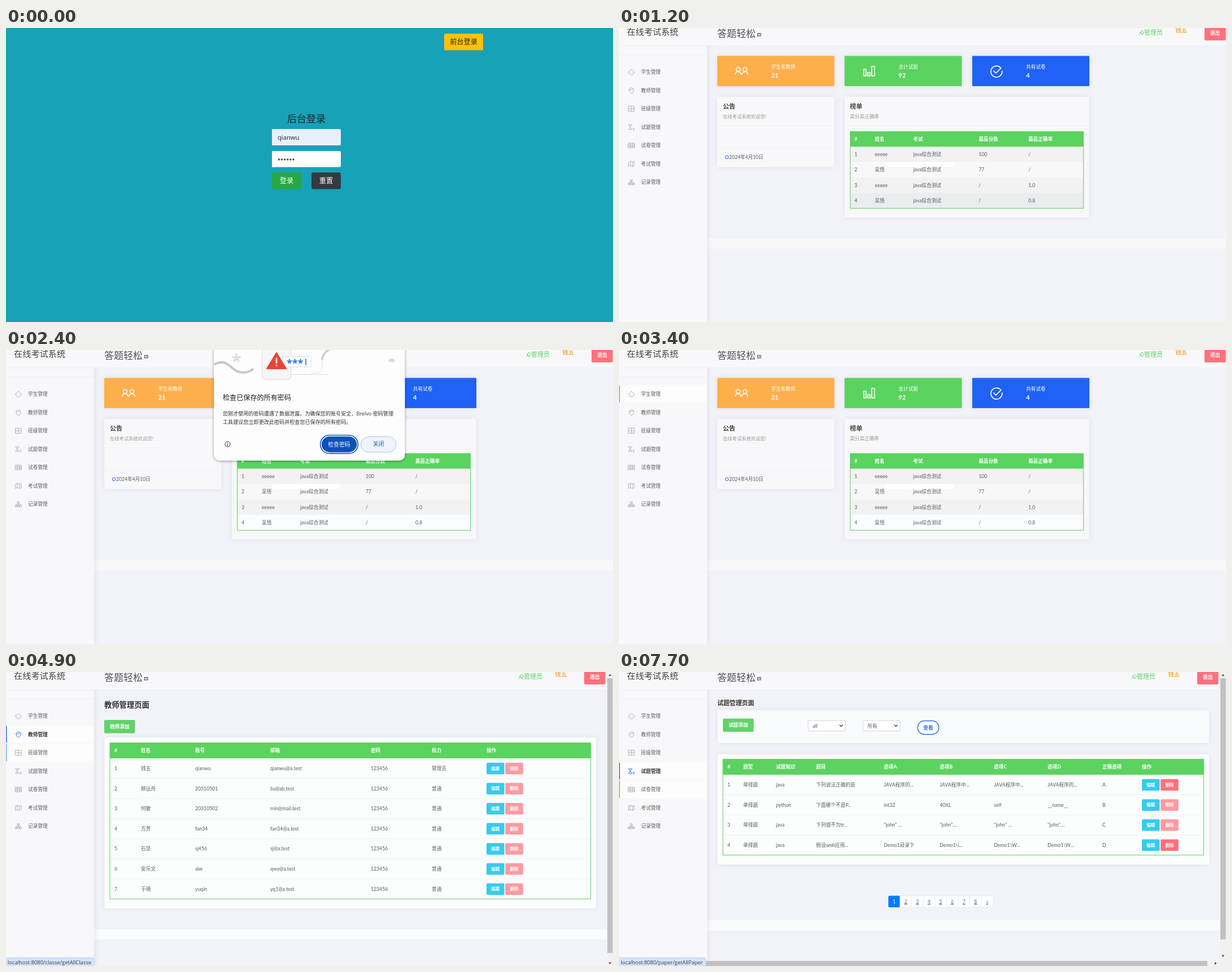
These frames come from a looping animation (1075x521 px, 8 s). An HTML page:

```html
<!DOCTYPE html>
<html lang="zh-CN">
<head>
<meta charset="utf-8">
<style>
  html, body { margin: 0; width: 100%; height: 100%; overflow: hidden; }
  svg { display: block; width: 1075px; height: 521px; font-family: Lato, "Noto Sans CJK SC", "Noto Sans CJK", sans-serif; }
  text { white-space: pre; }
  .ui { font-family: "Open Sans", "Noto Sans CJK SC", "Noto Sans CJK", sans-serif; }
  .b { font-weight: 700; }
  .m { text-anchor: middle; }
  .card { filter: drop-shadow(0 0 5px rgba(82, 63, 105, .1)); }
  .line { fill: none; stroke-linecap: round; stroke-linejoin: round; }
</style>
</head>
<body>
<svg id="stage" viewBox="0 0 1075 521"></svg>
<script>
const GREEN = '#5bd35f', BLUE = '#1f62f5', PINK = '#ff717c', PALE_PINK = '#ff9aa2', INK = '#595b64';

// Drawing helpers; text y is the vertical middle.
const rect = (x, y, w, h, fill, r = 0, extra = '') =>
  `<rect x="${x}" y="${y}" width="${w}" height="${h}" rx="${r}" fill="${fill}" ${extra}/>`;
const text = (x, y, str, size = 8.7, fill = INK, cls = '') =>
  `<text x="${x}" y="${y + size * .36}" font-size="${size}" fill="${fill}" class="${cls}">${str}</text>`;
const line = (d, stroke, w = 1, extra = '') =>
  `<path class="line" d="${d}" stroke="${stroke}" stroke-width="${w}" ${extra}/>`;
const button = (x, y, w, h, fill, label, size = 8, cls = 'b m', r = 2) =>
  rect(x, y, w, h, fill, r) + text(x + w / 2, y + h / 2, label, size, '#fff', cls);
const card = (x, y, w, h, fill = '#fcfdfd') => rect(x, y, w, h, fill, 1, 'class="card"');
const group = (opacity, content) => `<g opacity="${opacity}">${content}</g>`;

const ramp = (t, from, to) => Math.min(1, Math.max(0, (t - from) / (to - from)));
const mix = (a, b, k) => `rgb(${a.map((v, i) => Math.round(v + (b[i] - v) * k))})`;
const latest = (t, list, none) => list.reduce((found, [at, value]) => t >= at ? value : found, none);

const menu = [
  ['学生管理', 'M-5 0L0-5L5 0A5 5 0 0 1-5 0M-2 1h.1M2 1h.1'],
  ['教师管理', 'M-4-1C-4-6 4-6 4-1C4 3 2 5 0 5S-4 3-4-1M-4-1Q1-1 2-3L4-1'],
  ['班级管理', 'M-5-4.5H5V4.5H-5ZM0-4.5V4.5M-5 0H5'],
  ['试题管理', 'M-5-4L1 4M1-4L-5 4M-5-4H1M-5 4H1M3 2H5L3 5H5'],
  ['试卷管理', 'M-5.5-4H5.5V4H-5.5ZM-5.5-1.3H5.5M-5.5 1.3H5.5M-2-4V4M2-4V4'],
  ['考试管理', 'M-5-3L-2-4.5L2-3L5-4.5V3L2 4.5L-2 3L-5 4.5ZM-2-4.5V3M2-3V4.5'],
  ['记录管理', 'M-1.5-4.5H1.5V-2H-1.5ZM0-2V2M-4 2V0H4V2M-5.5 2H-2.5V4.5H-5.5ZM-1.5 2H1.5V4.5H-1.5ZM2.5 2H5.5V4.5H2.5Z']
];
const urls = ['student/getAllStudent', 'teacher/getAllTeacher', 'classe/getAllClasse',
  'question/getAllQuestion', 'paper/getAllPaper'];

const teachers = [
  ['钱五', 'qianwu', 'qianwu@a.test', '管理员'], ['柳远舟', '20310501', 'liu@ab.test', '普通'],
  ['何敏', '20310502', 'min@mail.test', '普通'], ['方芳', 'fan34', 'fan34@a.test', '普通'],
  ['石坚', 'sj456', 'sj@a.test', '普通'], ['安乐文', 'alw', 'qwe@a.test', '普通'], ['于晴', 'yuqin', 'yq1@a.test', '普通']
].map(([name, id, mail, role]) => [name, id, mail, '123456', role]);
const classes = [['计算机1班', 0], ['计算机2班', 1], ['电子商务1班', 2], ['数字媒体1班', 6],
  ['电子信息1班', 5], ['电子商务2班', 3], ['物联网1班', 4]].map(([name, i]) => [name, teachers[i][0]]);
const students = [...'悟明丽文青雪云乐宁晨雨山'].map((given, i) =>
  ['吴林孙程'[i % 4] + given, 20310401 + i, `stu${10 + i}@ab.test`, '123456', classes[i % 7][0]]);
const questions = [
  ['单择题', 'java', '下列说法正确的是', 'JAVA程序的...', 'JAVA程序中...', 'JAVA程序中...', 'JAVA程序的...', 'A'],
  ['单择题', 'python', '下面哪个不是P...', 'int32', '40XL', 'self', '__name__', 'B'],
  ['单择题', 'java', '下列值不为tr...', '"john" ...', '"john"....', '"john" ...', '"john"....', 'C'],
  ['单择题', 'java', '假设web应用...', 'Demo1目录下', 'Demo1\\i...', 'Demo1\\W...', 'Demo1\\W...', 'D']
];

// The last column holds the edit and delete buttons.
function table(top, heads, xs, rows, pink = () => PINK) {
  const pitch = 35.6, last = xs[xs.length - 1];
  let out = rect(184, top, 852, 28, GREEN);
  heads.forEach((h, i) => out += text(xs[i], top + 14, h, 8.6, '#fff', 'b'));
  rows.forEach((row, r) => {
    const y = top + 28 + pitch * (r + .5);
    [r + 1, ...row].forEach((cell, i) => out += text(xs[i], y, cell));
    if (r) out += line(`M184 ${y - pitch / 2}H1036`, '#eff1f4');
    out += button(last, y - 10, 31.5, 20.5, '#36cbee', '编辑', 7.6)
      + button(last + 33.3, y - 10, 31.5, 20.5, pink(r), '删除', 7.6);
  });
  return out + rect(184, top + .5, 851.5, 27.5 + pitch * rows.length, 'none', 0, `stroke="${GREEN}"`);
}

const footer = y => rect(156, y, 908, 18, '#fafbfc');
const addButton = (x, y, label) => button(x, y, 54.5, 23.5, '#62d26b', label, 8.7);

const pages = [
  () => text(174, 55, '学生管理页面', 10.9, '#333', 'b') + addButton(174, 69, '学生添加') + card(174.5, 100, 870.5, 480)
    + table(109.5, ['#', '姓名', '账号', '邮箱', '密码', '班级', '操作'], [192, 240, 336, 497, 670, 760, 883], students),
  () => text(174, 58, '教师管理页面', 13.3, '#2d2d33', 'b') + addButton(174, 85, '教师添加') + card(174.5, 116, 870.5, 303)
    + table(125, ['#', '姓名', '账号', '邮箱', '密码', '权力', '操作'], [192, 239, 335, 468, 646, 754, 851], teachers, () => PALE_PINK)
    + footer(456),
  () => text(174, 58, '班级管理页面', 13.3, '#2d2d33', 'b') + addButton(174, 85, '班级添加') + card(174.5, 116, 870.5, 303)
    + table(125, ['#', '班级名', '班主任', '操作'], [192, 275, 537, 705.5], classes) + footer(456),
  questionPage
];

function select(x, label) {
  return rect(x, 86, 66, 18.5, '#fff', 2, 'stroke="#ced4da"') + text(x + 8, 95.5, label, 8.7)
    + line(`M${x + 56} 94l2.5 2.5l2.5-2.5`, '#333', 1.3);
}

function questionPage() {
  let out = text(174, 55, '试题管理页面', 10.9, '#333', 'b') + card(174.5, 67.5, 870.5, 58.5, '#f9fafb')
    + addButton(184, 82.5, '试题添加') + select(335, 'all') + select(432, '所有')
    + rect(529, 86.5, 37.5, 24, '#fff', 12, 'stroke="#2b6cf0" stroke-width="1.4"') + text(547.7, 98.5, '查看', 8.6, '#2b6cf0', 'b m')
    + card(174.5, 145.5, 870.5, 195.5)
    + table(154, ['#', '题型', '试题知识', '题目', '选项A', '选项B', '选项C', '选项D', '正确选项', '操作'],
      [192, 220, 278, 349, 469, 568, 664, 759, 856, 926], questions, r => r % 3 ? PALE_PINK : PINK);
  [...'12345678»'].forEach((n, i) => {
    const x = 477 + i * 20.6;
    out += rect(x, 396.5, 20.6, 20.5, i ? '#fff' : '#007bff', i ? 0 : 2, i ? 'stroke="#e3e6ea" stroke-width=".8"' : '')
      + `<g ${i ? 'text-decoration="underline"' : ''}>${text(x + 10.3, 406.7, n, 8.7, i ? '#2b7de9' : '#fff', 'm')}</g>`;
  });
  return out + footer(440);
}

function dashboard(t) {
  const tile = (x, fill, label, n, icon) => card(x, 49.5, 207.5, 53.5, fill)
    + text(x + 95.5, 69, label, 8.6, '#fff') + text(x + 95.5, 84, n, 11, '#fff', 'b')
    + line(icon, '#fff', 1.7, `transform="translate(${x + 43} 76)"`);
  const person = x => `M${x - 5} 6C${x - 5} 0 ${x + 5} 0 ${x + 5} 6M${x - 3.5}-2.5a3.5 3.5 0 1 0 7 0a3.5 3.5 0 1 0-7 0`;
  let out = tile(174, '#fdaf4b', '学生和教师', 21, person(-6) + person(6))
    + tile(399.5, GREEN, '总计试题', 92, 'M-9-3h4v12h-4zM-2 3h4v6h-4zM5-8h5v17h-5z')
    + tile(625.5, BLUE, '共有试卷', 4, 'M7-6A10 10 0 1 0 10 0M-5 0l4 4l9-9')
    + card(174, 122, 207.5, 124.5, '#f8f8fa') + text(184, 139, '公告', 11, '#444', 'b')
    + text(184, 157, '在线考试系统欢迎您!', 8.3, '#999') + line('M174 173.5H381M174 213.5H381M400 173.5H832', '#eff0f3')
    + '<circle cx="191" cy="229" r="2.8" fill="none" stroke="#2b6cf0"/>' + text(195, 229, '2024年4月10日', 8.6)
    + card(400, 122, 432.5, 213.5, '#f8f8fa') + line('M400 173.5H832', '#eff0f3')
    + text(409, 139, '榜单', 11, '#444', 'b') + text(409, 157, '高分高正确率', 8.6, '#999')
    + rect(409, 183, 414, 27.5, GREEN);
  const xs = [417, 453, 521, 637, 725], exam = 'java综合测试';
  ['#', '姓名', '考试', '最高分数', '最高正确率'].forEach((h, i) => out += text(xs[i], 197, h, 8.6, '#fff', 'b'));
  const hovered = mix([235, 236, 238], [250, 252, 255], ramp(t, 1400, 1700));
  [['eeeee', exam, 100, '/'], ['吴悟', exam, 77, '/'], ['eeeee', exam, '/', '1.0'], ['吴悟', exam, '/', '0.8']].forEach((row, r) => {
    const y = 210.5 + r * 27.2;
    out += rect(409, y, 414, 27.2, r == 3 ? hovered : r % 2 ? '#f8f8fa' : '#f2f2f3');
    [r + 1, ...row].forEach((cell, i) => out += text(xs[i], y + 13.6, cell));
  });
  return out + rect(409.5, 183.5, 413, 136, 'none', 0, `stroke="${GREEN}"`)
    + rect(472, 237.5, 120, 8.5, '#fff') + rect(156, 373, 919, 18, '#f8f8fa');
}

function dialog(t) {
  const k = ramp(t, 2100, 2400);
  return rect(368, -20, 338.5, 216, '#fdfdfe', 10, 'style="filter:drop-shadow(0 1px 2px rgba(0,0,0,.4))"')
    + text(408, 19, '*', 32, '#dadce0', 'b m ui')
    + line('M370 25C385 17 393 25 402 33S426 43 437 34', '#c4c7cc', 4)
    + line('M504 43.5H570M541 41C556 42 560 39 560 28V16Q562 3 575-2', '#d8dbdf')
    + line('M560 16Q562 3 575-2', '#c4c7cc', 3)
    + rect(453.5, -8, 51, 60, '#f5f6f8', 5, 'stroke="#d5d8dd"')
    + rect(490, 11.5, 50, 18.5, '#fff', 2, 'stroke="#d5d8dd"')
    + text(497, 23.5, '***', 18, '#2b6fe0', 'b ui') + line('M531 16V26', '#2b6fe0', 1.6)
    + '<path d="M479 5L496 33H462Z" fill="#ea4335" stroke="#ea4335" stroke-width="2" stroke-linejoin="round"/>'
    + line('M479 15V23M479 27.5v.1', '#fff', 2.6)
    + '<path d="M677 21a6 6 0 0 1 12 0z" fill="#dadce0"/>'
    + text(384, 84.5, '检查已保存的所有密码', 12.1, '#1f1f1f', 'ui')
    + text(384, 113, '您刚才使用的密码遭遇了数据泄露。为确保您的账号安全，Brelvo 密码管理', 9.1, '#333', 'ui')
    + text(384, 128, '工具建议您立即更改此密码并检查您已保存的所有密码。', 9.1, '#333', 'ui')
    + '<circle cx="392.5" cy="167" r="4.6" fill="none" stroke="#333"/>' + line('M392.5 166.5V169.5M392.5 164.6v.1', '#333', 1.1)
    + rect(556.8, 151, 66.5, 32.4, '#fff', 16, 'stroke="#0b57d0" stroke-width="1.6"')
    + rect(559, 153.2, 62.2, 28, mix([38, 103, 212], [11, 80, 190], k), 14) + text(590, 167, '检查密码', 9.9, '#fff', 'm ui')
    + rect(628.5, 153.5, 62.5, 27.5, mix([255, 255, 255], [240, 243, 249], k), 14, 'stroke="#a8c7e6"')
    + text(659.7, 167, '关闭', 9.7, '#0b57d0', 'm ui');
}

function scrollbars(page) {
  const wide = page == 3, bottom = wide ? 508 : 521, end = [390, 498, 498, 474][page];
  let out = rect(1064, 0, 11, 521, '#f1f1f1') + rect(1065, 11, 9.5, end - 11, '#c1c1c1')
    + `<path d="M1067 7l2.7-3.5l2.7 3.5zM1067 ${bottom - 6.5}l2.7 3.5l2.7-3.5z" fill="#555"/>`;
  if (wide) out += rect(0, 511, 1064, 10, '#f1f1f1') + rect(11, 512, 1031, 9, '#c1c1c1')
    + '<path d="M1055 513.5l3.5 2.7l-3.5 2.7z" fill="#555"/>';
  return out;
}

function frame(t, page) {
  const hover = latest(t, [[2800, 1], [3200, 0], [4000, 1], [4800, 2], [6600, 3], [7700, 4]], -1);
  const shift = page < 0 ? 0 : -13;
  let out = rect(0, 0, 156, 521, '#f8f8fa', 0, 'style="filter:drop-shadow(1px 0 5px rgba(82,63,105,.12))"')
    + rect(156, 0, 919, 31, '#f8f8fa') + line('M0 31.5H1075M0 47.5H156', '#efeff3')
    + text(14, 7, '在线考试系统', 15.2, '#444') + text(174, 10, '答题轻松', 17, '#505259')
    + rect(245.5, 9.5, 5.5, 4.5, 'none', 0, 'stroke="#444"') + line('M246 14v1M247.5 11.5h2', '#444', .8)
    + line('M921 12l3-3M922 7l5 5M923 8l3-4l4 4l-4 3', GREEN, 1, `transform="translate(${shift} 0)"`)
    + text(930 + shift, 8.5, '管理员', 11, GREEN) + text(985 + shift, 4, '钱五', 10.8, '#fdaf4b', 'b')
    + button(1037 + shift, -4, 37.5, 26, PINK, '退出', 8.7);
  menu.forEach(([label, icon], i) => {
    const y = 78 + i * 32.55, active = i == page;
    if (active || i == hover) out += rect(0, y - 15, 155, 30, '#fbfcfb') + rect(0, y - 15, 1.4, 30, active ? '#1f6bf2' : '#6aa5f5');
    out += line(icon, active ? '#2b6cf0' : '#aaacb2', .9, `transform="translate(22 ${y})"`)
      + text(39, y, label, 8.7, active ? '#333' : INK, active ? 'b' : '');
  });
  if (page >= 0) {
    const url = 'localhost:8080/' + urls[hover];
    out += scrollbars(page) + rect(-4, 506, [172, 173, 161, 186, 158][hover], 19, '#d3e3fd', 4, 'stroke="#c3d3ee" stroke-width=".8"')
      + text(3, 515, url, 9.35, '#3c4043', 'ui');
  }
  return out;
}

function login(t) {
  const hover = ramp(t, 100, 400), focus = ramp(t, 500, 1000);
  return rect(0, 0, 1075, 521, '#17a2b8')
    + rect(776, 10, 69, 29.5, '#ffc107', 3) + text(810.5, 25, '前台登录', 12.2, '#212529', 'm ui')
    + text(532, 160.5, '后台登录', 17, '#212529', 'm ui')
    + rect(471, 179, 122, 29, '#e8f0fe', 3) + rect(471, 179, 5, 29, '#e8f0fe') + text(481, 194, 'qianwu', 11.2, '#212529', 'ui')
    + rect(471, 218, 122, 28.5, '#fff', 3) + rect(471, 218, 5, 28.5, '#fff')
    + [...'123456'].map((_, i) => `<circle cx="${483.5 + i * 5.1}" cy="233" r="1.8" fill="#495057"/>`).join('')
    + group(focus * .5, rect(469, 254, 56, 33.5, '#48b461', 5))
    + button(471, 256, 52, 29.5, mix([40, 167, 69], [33, 136, 56], hover), '登录', 12.2, 'm ui', 3)
    + button(541, 256, 52, 29.5, '#343a40', '重置', 12.2, 'm ui', 3);
}

function scene(t) {
  if (t < 1200) return login(t);
  const page = latest(t, [[3500, 0], [4700, 1], [6200, 2], [7600, 3]], -1);
  const backdrop = rect(0, 0, 1075, 521, '#f2f3f8');
  if (page >= 0) return backdrop + pages[page]() + frame(t, page);
  const shown = ramp(t, 1400, 1700) - ramp(t, 2500, 2800);
  return backdrop + dashboard(t) + frame(t, page) + (shown > 0 ? group(shown, dialog(t)) : '');
}

const stage = document.getElementById('stage');
let shownStep = -1;
function tick() {
  const step = Math.floor(performance.now() % 8000 / 100) * 100;
  if (step !== shownStep) stage.innerHTML = scene(shownStep = step);
  requestAnimationFrame(tick);
}
tick();
</script>
</body>
</html>
```
